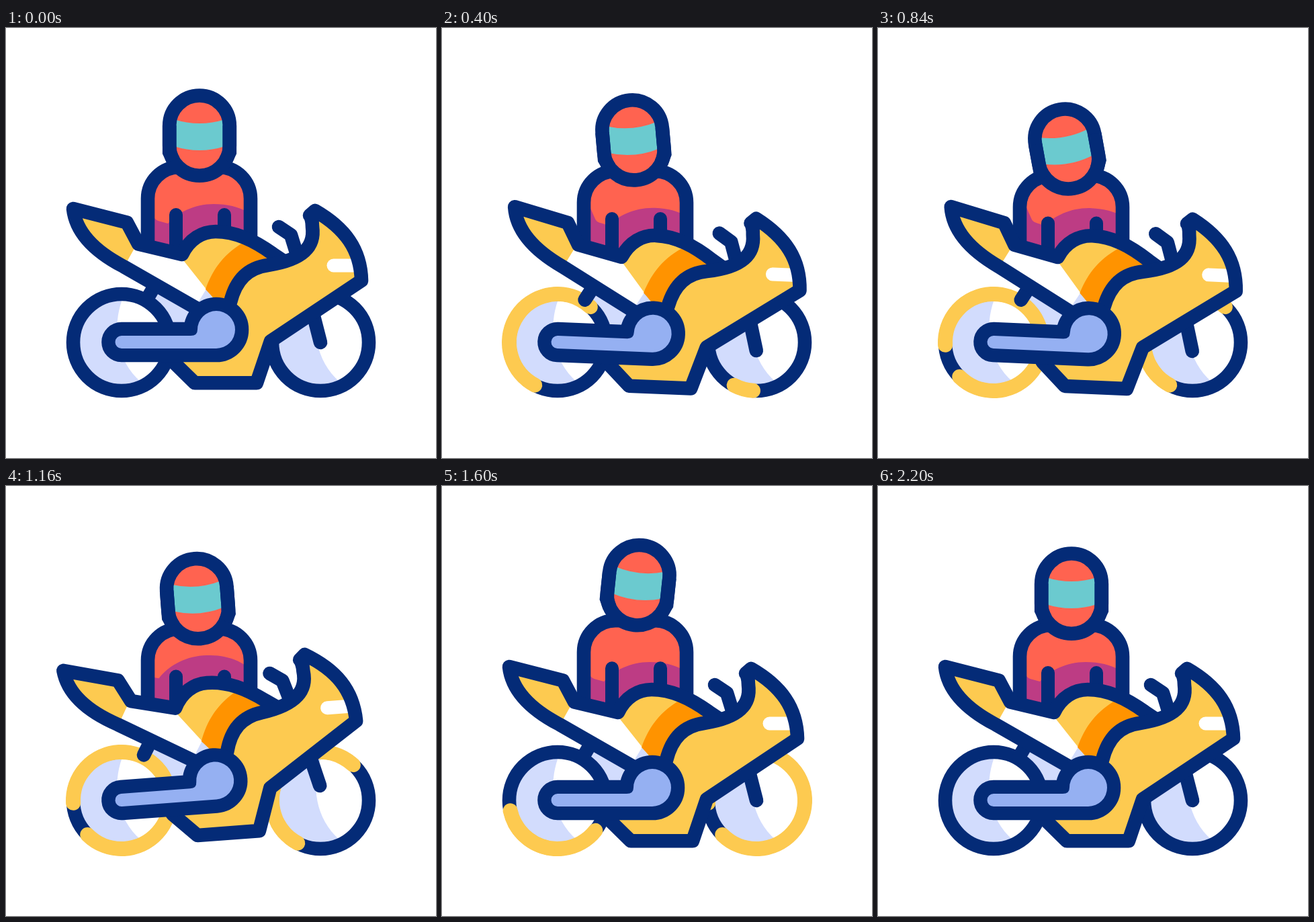
Animation of 640x640 px, one loop 2440 ms. Source, as an HTML page with a canvas:

```html
<!DOCTYPE html>
<html lang="en">
<head>
<meta charset="utf-8">
<title>Rider and motorbike</title>
<style>
  html, body { margin: 0; width: 100%; height: 100%; overflow: hidden; background: #fff; }
  canvas { display: block; width: 640px; height: 640px; }
</style>
</head>
<body>
<canvas id="stage" width="640" height="640"></canvas>
<script>
const ctx = document.getElementById('stage').getContext('2d');

const NAVY = '#042b77', YELLOW = '#fdca50', ORANGE = '#ff9300', RED = '#ff6350';
const PURPLE = '#bd3c84', TEAL = '#6bcacf', PALE = '#d2dcfd', BLUE = '#95b0f2', WHITE = '#fff';
const LOOP = 2440, STEP = 40, LAST = 2200, RAD = Math.PI / 180, WEIGHT = 20.6;
const HUB = { x: 172, y: 468 }, FRONT_X = 468;

// Motion keys: [time, value]
const LEAN = [[0, 0], [480, 2.5], [840, 2.5], [1140, -4.3], [1560, 0], [1800, 0], [2000, -3.8], [2200, 0]];
const riderKeys = (up, low, high) =>
  [[0, 0], [160, up], [630, low], [980, low], [1460, high], [1820, 0]];
const HEAD_Y = riderKeys(-7, 19.2, -19);
const HEAD_TURN = riderKeys(0.5, -10.3, 9);
const TORSO_Y = riderKeys(-1, 12.5, -10);

const ease = u => (1 - Math.cos(Math.PI * Math.min(1, Math.max(0, u)))) / 2;

function at(keys, t) {
  for (let i = 1; i < keys.length; i++) {
    const [t0, a] = keys[i - 1], [t1, b] = keys[i];
    if (t < t1) return a + (b - a) * ease((t - t0) / (t1 - t0));
  }
  return keys[keys.length - 1][1];
}

// Shapes, all in resting position
const shape = d => new Path2D(d);
const HUMP = 'C273 314 292 303 312 303 C342 303 369 316 397 336';
const COWL_EDGE = 'C342 375 360 357 390 353';

const torso = shape('M211 345 V254 A47 47 0 0 1 258 207 H317 A47 47 0 0 1 364 254 V345');
const shade = shape('M200 240 L213 267 L221 283 Q224 287 230 288 L241 291 ' +
  'C255 275 280 262 309 262 C330 262 345 266 360 274 L400 300 V420 H200 Z');
const arms = shape('M253 278 V345 M325 278 V345');
const helmet = shape('M243.2 145.3 A44.8 44.8 0 0 1 332.8 145.3 V175 A44.8 44.8 0 0 1 243.2 175 Z');
const helmetSides = shape('M243.2 145 V185 L249 197 M332.8 145 V185 L327 197');
const visor = shape('M250 136 Q288 148 326 136 V176 Q288 188 250 176 Z');
const underside = shape('M218 388 L285 420 L275 445 H235 Z');
const tyreShade = shape('M173 404 C158 445 164 495 201 527 L172 532 A64 64 0 0 1 172 404 Z');
const strut = shape('M210 403 L226 376');
const fork = shape('M457 425 L468 468');
const bars = shape('M406 296 L424 308 L432 334');
const body = shape('M100 269 L180 289.5 L197 321.5 L262 337 ' + HUMP +
  ' L334 408 L285 418 L175 355 C133 333 104 305 100 269 Z');
const bodyLine = shape('M285 418 L175 355 C133 333 104 305 100 269 L180 289.5 L197 321.5 L262 337 ' +
  HUMP + ' L412 346');
const tail = shape('M100 269 L180 289.5 L195 321 L176 355 L175 355 C133 333 104 305 100 269 Z');
const seat = shape('M257 337 L262 337 ' + HUMP + ' L334 408 H313 L299 390 Z');
const seatShade = shape('M299 387 L285 410 H320 Z');
const band = shape('M357 317 C325 335 308 358 297 389 L313 406 L334 408 ' + COWL_EDGE + ' L396 340 Z');
const cowl = shape('M334 408 ' + COWL_EDGE + ' C430 347 461 333 456 296 C456 287 454 281 452 279 ' +
  'L460 272 C505 298 528 330 529 376 L394 466 L373 528.3 H281 L246 494 Z');
const lamp = shape('M487.5 353.5 H524');
const engine = shape('M172 458 H275 Q285 458 285 449 A28 28 0 1 1 313 477 H172 A9.5 9.5 0 0 1 172 458 Z');

function fill(path, color) {
  ctx.fillStyle = color;
  ctx.fill(path);
}

function line(path, color = NAVY, width = WEIGHT, cap = 'round', join = 'round') {
  ctx.strokeStyle = color;
  ctx.lineWidth = width;
  ctx.lineCap = cap;
  ctx.lineJoin = join;
  ctx.stroke(path);
}

function group(draw) {
  ctx.save();
  draw();
  ctx.restore();
}

function turn(x, y, degrees) {
  ctx.translate(x, y);
  ctx.rotate(degrees * RAD);
  ctx.translate(-x, -y);
}

const leanBike = t => turn(HUB.x, HUB.y, at(LEAN, t));

function drawRider(t) {
  const dy = at(TORSO_Y, t);
  group(() => {
    ctx.translate(0, dy);
    fill(torso, RED);
    group(() => {
      ctx.clip(torso);
      ctx.translate(0, -dy);
      leanBike(t);
      fill(shade, PURPLE);
    });
    line(torso, NAVY, WEIGHT, 'butt');
    line(arms, NAVY, 20);
  });
  group(() => {
    ctx.translate(0, at(HEAD_Y, t));
    turn(288, 200, at(HEAD_TURN, t));
    fill(helmet, RED);
    fill(visor, TEAL);
    line(helmet);
    line(helmetSides, NAVY, WEIGHT, 'butt', 'miter');
  });
}

function drawStreak(age) {
  const end = 90 + 422 * ease((age + 96) / 340);
  const start = Math.max(90 + 0.2 * (age + 60), 90 + 422 * ease((age - 98) / 340));
  if (age < -80 || end - start < 1) return;
  const arc = new Path2D();
  arc.arc(HUB.x, HUB.y, 72, start * RAD, end * RAD);
  line(arc, YELLOW, 22);
}

function drawWheel(x, t) {
  group(() => {
    ctx.translate(x - HUB.x, 0);
    const ring = new Path2D();
    ring.arc(HUB.x, HUB.y, 72, 0, 2 * Math.PI);
    fill(ring, WHITE);
    fill(tyreShade, PALE);
    line(ring);
    for (let i = 1; i <= 5; i++) drawStreak(t - 320 * i);
  });
}

function drawBike(t) {
  group(() => {
    leanBike(t);
    line(strut);
    line(fork);
    line(bars);
    fill(body, WHITE);
    fill(tail, YELLOW);
    fill(seatShade, PALE);
    fill(seat, YELLOW);
    fill(band, ORANGE);
    line(bodyLine);
    fill(cowl, YELLOW);
    line(lamp, WHITE, 20);
    line(cowl);
    line(engine, NAVY, 2 * WEIGHT - 0.6);
    fill(engine, BLUE);
  });
}

function draw(t) {
  ctx.fillStyle = WHITE;
  ctx.fillRect(0, 0, 640, 640);
  drawRider(t);
  group(() => {
    leanBike(t);
    fill(underside, PALE);
  });
  drawWheel(HUB.x, t);
  drawWheel(FRONT_X, t - 120);
  drawBike(t);
}

const origin = performance.now();
function tick() {
  const t = (performance.now() - origin) % LOOP;
  draw(Math.min(LAST, Math.floor(t / STEP) * STEP));
  requestAnimationFrame(tick);
}
tick();
</script>
</body>
</html>
```
